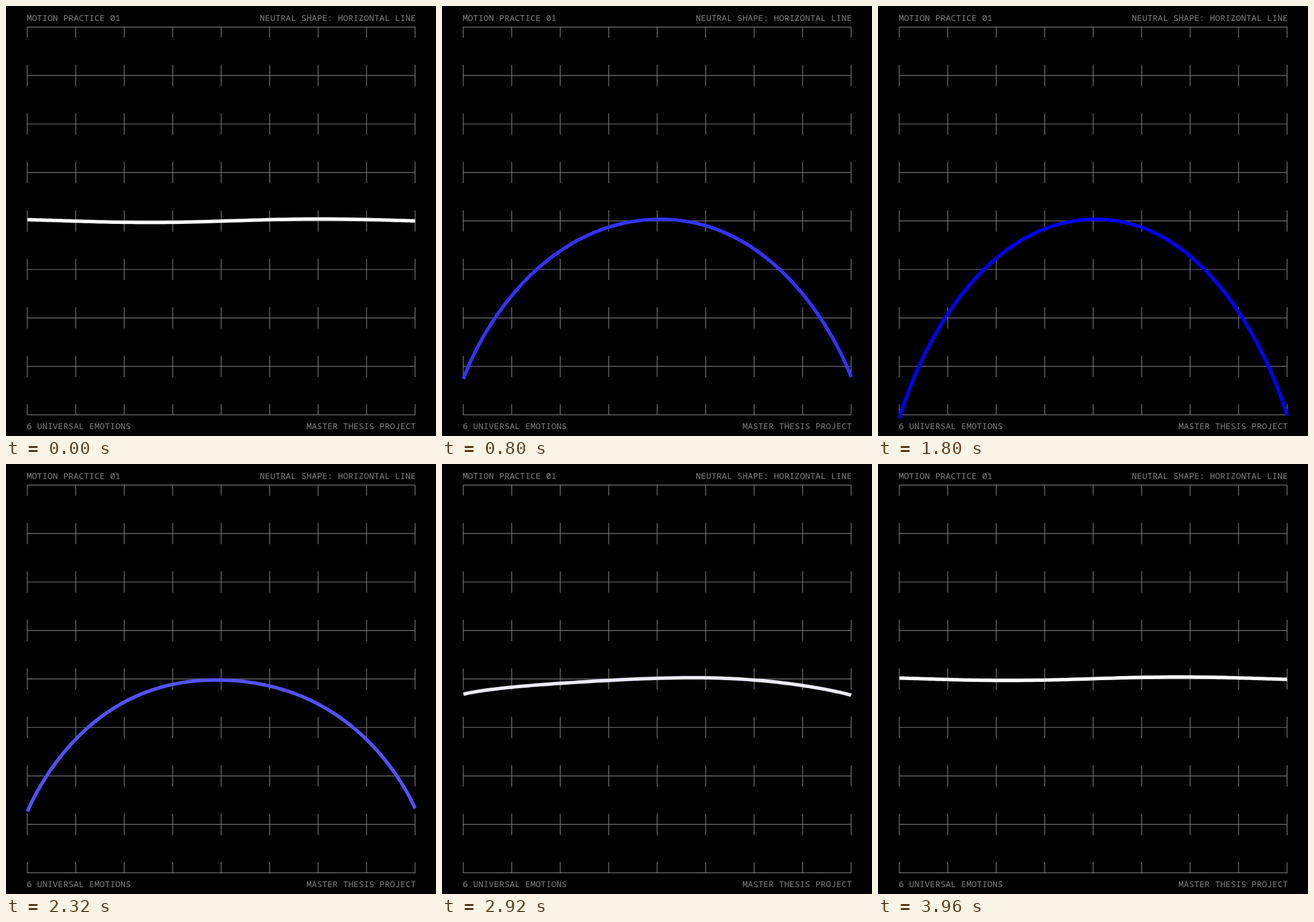
An HTML page for the animation above (4 s loop, 748x748 px).

```html
<!DOCTYPE html>
<html lang="en">
<head>
<meta charset="utf-8">
<title>Motion practice</title>
<style>
  html, body { margin: 0; width: 100%; height: 100%; overflow: hidden; background: #000; }
  svg { display: block; width: 100%; height: 100%; }
  text { font: 300 15.1px "Noto Sans Mono", "DejaVu Sans Mono", monospace; fill: #808080; }
  .end { text-anchor: end; }
  #grid { fill: none; stroke: #808080; stroke-width: 1.2; }
  #line { fill: none; stroke-width: 6; stroke-linejoin: round; }
</style>
</head>
<body>
<svg viewBox="0 0 748 748">
  <path id="grid"/>
  <text x="36" y="26">MOTION PRACTICE 01</text>
  <text x="713" y="26" class="end">NEUTRAL SHAPE: HORIZONTAL LINE</text>
  <text x="36" y="735.5">6 UNIVERSAL EMOTIONS</text>
  <text x="713" y="735.5" class="end">MASTER THESIS PROJECT</text>
  <path id="line"/>
</svg>
<script>
  const LOOP = 4000, STEP = 40;
  const CELLS = 8, TICK = 18.5, LEFT = 37, TOP = 36.6, SIZE = 674.6;
  const MID_X = 374.5, MID_Y = 373.5, HALF = 337.2;
  const DROP = 339, HANDLE = 0.725, TILT = 0.008;
  const WAVE = { height: 3, length: 600, period: 1000, phase: 0.04 };

  const grid = document.getElementById("grid");
  const line = document.getElementById("line");
  const clamp = v => Math.min(1, Math.max(0, v));

  function gridPath() {
    const cell = SIZE / CELLS, bottom = TOP + SIZE;
    let d = "";
    for (let r = 0; r <= CELLS; r++) {
      const y = TOP + r * cell;
      d += `M${LEFT - 0.5} ${y}H${LEFT + SIZE + 0.5}`;
      for (let c = 0; c <= CELLS; c++) {
        const from = Math.max(TOP, y - TICK), to = Math.min(bottom, y + TICK);
        d += `M${LEFT + c * cell} ${from}V${to}`;
      }
    }
    return d;
  }

  // One half of the arch is a cubic curve with a flat handle at its top.
  function archPoint(s, bend) {
    const u = Math.abs(s), side = Math.sign(s), v = 1 - u;
    const x = 3 * HANDLE * u * v * v + 3 * u * u * v + u ** 3;
    const y = 3 * u * u - 2 * u ** 3;
    return [MID_X + side * x * HALF, MID_Y + y * DROP * bend * (1 - side * TILT * y)];
  }

  function ripple(x, t) {
    const turn = t / WAVE.period + WAVE.phase - (x - MID_X) / WAVE.length;
    return WAVE.height * Math.sin(2 * Math.PI * turn);
  }

  // Bends for a second, holds, straightens for a second, holds.
  const bendAt = t => clamp(t / 1000) - clamp((t - 2000) / 1000);

  function draw(t) {
    const bend = bendAt(t), n = 60, points = [];
    for (let i = -n; i <= n; i++) {
      const [x, y] = archPoint(i / n, bend);
      points.push(`${x.toFixed(2)} ${(y + ripple(x, t)).toFixed(2)}`);
    }
    const pale = Math.round(255 * (1 - bend));
    line.setAttribute("d", "M" + points.join("L"));
    line.setAttribute("stroke", `rgb(${pale},${pale},255)`);
  }

  function tick() {
    const t = performance.now() % LOOP;
    draw(Math.floor(t / STEP) * STEP);
    requestAnimationFrame(tick);
  }

  grid.setAttribute("d", gridPath());
  tick();
</script>
</body>
</html>
```
